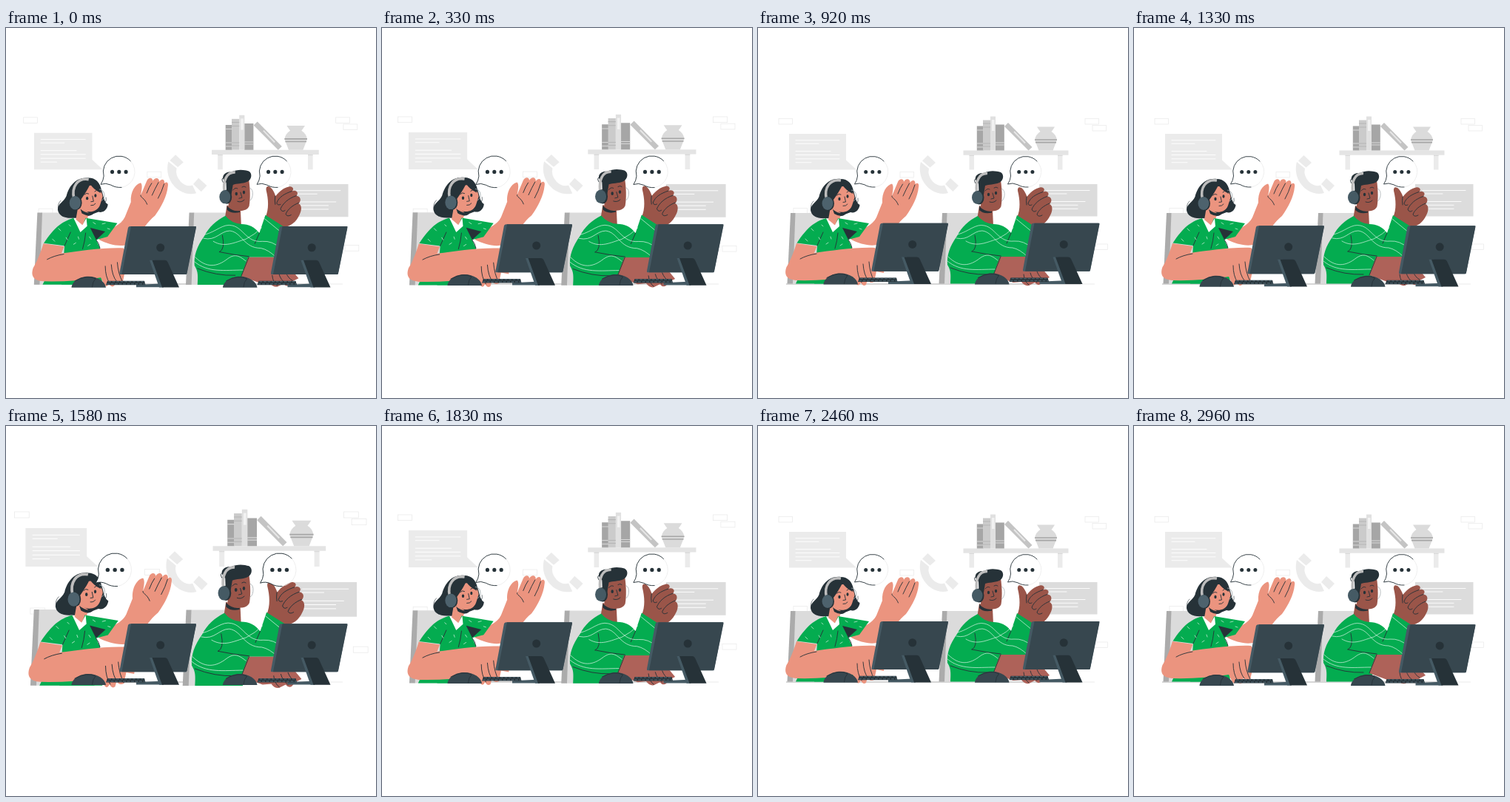
These frames come from a looping animation (500x500 px, 3000 ms). An HTML page:

```html
<!DOCTYPE html>
<html lang="en">
<head>
<meta charset="utf-8">
<title>Call centre</title>
<style>
  html, body { margin: 0; width: 100%; height: 100%; overflow: hidden; background: #fff; }
  svg { display: block; width: 100vw; height: 100vh; }
  .line { fill: none; stroke: #263238; stroke-width: .9; stroke-linecap: round; stroke-linejoin: round; }
  .white { fill: none; stroke: #fff; stroke-width: .9; stroke-linecap: round; }
  .thin { stroke-width: .6; }
  .faint { fill: none; stroke: #e9e9e9; stroke-width: .7; }
  .dark { fill: #263238; }
  .skin { fill: #eb947f; }
  .brown { fill: #9a5549; }
  .green { fill: #04ac50; }
</style>
</head>
<body>
<svg viewBox="0 0 500 500">
  <defs>
    <g id="bubble">
      <path fill="#fff" d="M134.500 200A21 21 0 1 1 144 211.800Q137 208.500 130.500 211Q134 206 134.500 200Z"/>
      <path class="faint" d="M170 180A21 21 0 0 1 158 215"/>
      <path class="line" d="M170 180A21 21 0 0 0 134.500 200Q134 206 130.500 211Q137 208.500 144 211.800Q150 215.500 158 215"/>
      <g class="dark">
        <circle cx="145.700" cy="194.400" r="2.500"/><circle cx="154.800" cy="194.400" r="2.500"/><circle cx="163.900" cy="194.400" r="2.500"/>
      </g>
    </g>
    <g id="desk-set">
      <path fill="#455a64" d="M176 347.300L209 345.800L212 350.500H176Z"/>
      <path class="dark" d="M137 342H187L188.500 347.500H135Z"/>
      <path d="M138 343H187M136 346H188" stroke="#455a64" stroke-width="1.500" stroke-dasharray="4 1.500" fill="none"/>
      <path fill="#455a64" d="M168 268.300H257L244 333.300H154.500Q153 333.300 153.500 331L165 270Q165.500 268.300 168 268.300Z"/>
      <path fill="#37474f" d="M169 268.300H255.500Q257.200 268.300 256.900 270.200L244.600 331.500Q244.200 333.300 242.500 333.300H156.500Z"/>
      <circle class="dark" cx="208.700" cy="297" r="5.500"/>
      <path fill="#455a64" d="M194 314H201L213 350.700H207Z"/>
      <path class="dark" d="M197.500 314H215Q217.500 314 218.500 316.500L234 350.700H211Z"/>
      <path fill="#37474f" d="M88.500 351C89 343 99 336 111.500 336C124 336 134 343 135 351Z"/>
      <path class="line" d="M93 342Q110 333 121 339Q117 343 116.500 350"/>
    </g>
    <rect id="tag" class="faint" width="18.500" height="7.500"/>
    <g id="chair">
      <path fill="#dbdbdb" d="M50 250H93V345.500H46Z"/>
      <path fill="#ababab" d="M44 250H50.500L47 345.500H39.500Z"/>
    </g>
  </defs>

  <g id="wall">
    <g id="tags"></g>

    <path fill="#ebebeb" d="M42 143H119V178.500L133 191.500H42Z"/>
    <path class="white" d="M51 151.700H110M51 156.300H82M51 166.500H98M51 171.500H110M51 176.800H110M51 181.700H72"/>

    <path fill="#ebebeb" d="M285.500 171H292V191.500H285.500ZM405 171H411.500V191.500H405Z"/>
    <path fill="#e4e4e4" d="M277.500 165.500H419.500V171.700H277.500Z"/>
    <path fill="#dadada" d="M285.500 171.700H292V173H285.500ZM405 171.700H411.500V173H405Z"/>
    <path fill="#a6a6a6" d="M295.800 132.500H304.500V165.500H295.800ZM320.800 130.500H332.800V165.500H320.800Z"/>
    <path fill="#cbcbcb" d="M304 124.500H314V165.500H304Z"/>
    <path fill="#e0e0e0" d="M314 119.500H321V165.500H314Z"/>
    <path fill="#f2f2f2" d="M316 124H319.500V139H316Z"/>
    <path stroke="#d8d8d8" fill="none" d="M295.800 138H304.500M295.800 156H304.500M295.800 161H304.500M320.800 155H332.800M320.800 158H332.800"/>
    <path stroke="#b5b5b5" fill="none" d="M304 129H314M304 134H314M304 156H314M304 160H314"/>
    <path fill="#c4c4c4" d="M338 128L370.500 161L365.500 165.500L333 133Z"/>
    <path stroke="#e6e6e6" stroke-width="2" fill="none" d="M346 140L361 155.500"/>
    <path fill="#dbdbdb" d="M377 133.500H401Q399 137 396.500 140Q403 144 404 151.500L398.500 165.500H379.500L374 151.500Q375 144 381.500 140Q379 137 377 133.500Z"/>
    <path stroke="#a6a6a6" stroke-width="1.600" fill="none" d="M374 151H404M375 154.600H403"/>

    <path fill="#ebebeb" d="M229.500 172L240 182L232.500 188.500L222 179.500ZM260 203L271 213L263.500 221L253 211ZM220 181C216 196 222 211 235 219.500Q246 226 257 223L252 212.500Q244 215 236.500 208Q228.500 199 231 190Z"/>

    <path fill="#dcdcdc" d="M380 211H458.500V254.500H378Z"/>
    <path class="white" d="M390 219.500H448M390 224H417M390 234.500H442M390 239.300H432M390 244.300H432"/>
  </g>

  <path stroke="#777" stroke-width=".6" fill="none" d="M38 346H436"/>
  <path stroke="#ddd" stroke-width=".6" fill="none" d="M436 346H455"/>

  <g id="woman">
    <use href="#chair"/>
    <path class="skin" d="M126 282C142 270 155 267 160 256L168 236C167 222 174 212 181 210.500C184 213 182 222 181 227L189 208C191 203 197 203 197 208C200 202 206 204 205.500 209C209 204 213 206 212.500 211C216 208 218 211 217 215C216 228 208 243 200 254C190 262 182 275 172 288C160 298 140 293 126 286Z"/>
    <path class="line" d="M195.500 211Q192 216 189 224M204.500 210Q200 218 196 227M212 212Q209 222 204 231M181 227C180 230 186 230 189.500 239"/>
    <path class="dark" d="M112 204C96 202 86 214 82.500 228C79 236 71 238 71 246C72 254 80 258 92 257Q103 258 112 254L125 249C132 251 137 245 137.500 239C132 236 132 228 129 220C127 210 121 204 112 204Z"/>
    <path class="line thin" d="M75 234C69 240 71 248 78 255M131 233Q136 240 135 230"/>
    <path class="skin" d="M98 242L112 250L108 270L95 259Z"/>
    <path class="dark" d="M101 245Q110 253 120 249Q115 258 103 251Z"/>
    <path class="skin" d="M100 226C104 213 119 210 125 220Q130 222 130.500 229Q129 234 127 240C123 251 108 251 101 244Z"/>
    <path class="dark" d="M96 242C102 231 110 222 114 212C117 217 122 221 128 224C128 213 121 205 112 205C99 206 92 220 96 242Z"/>
    <path class="line" d="M106.500 226Q109 223 112 225M120 222Q123 219 125 221M117 228L118.500 235L115 235.500M115 240.500Q119 241 121 238"/>
    <ellipse class="dark" cx="110" cy="231" rx="1.600" ry="2.200"/><ellipse class="dark" cx="121" cy="227.500" rx="1.500" ry="2.200"/>
    <path fill="none" stroke="#9aa5aa" stroke-width=".8" d="M126 219Q133 220 133 228Q132 233 129 234"/>
    <path fill="none" stroke="#bdbdbd" stroke-width="3.500" d="M92.500 231C89 216 97 203.500 112 206"/>
    <ellipse class="dark" cx="96" cy="237" rx="7" ry="9.500"/>
    <ellipse fill="#4d626d" cx="94" cy="237" rx="7.500" ry="9"/>

    <path class="green" d="M92 257C76 262 67 269 52.500 290.500L80 294L76 345.500H130L127 297L122 286L137 282L150 264L108 257L102 273Z"/>
    <path class="green" d="M55 337H120V345.500H51Z"/>
    <path fill="#fff" d="M92 257L101 276L110 268L109 257L103 268Z"/>
    <path class="dark" d="M114 270L134 275L122 286Z"/>
    <path class="line" d="M80 294L88 276M108 277Q107 288 104 298M122 286Q126 291 127 297"/>
    <path class="white thin" d="M64 285L67 288M72 271L75 274M82 283L84 286M92 292L95 290M98 282L99 285M113 282L115 285M118 263L121 265M130 265L134 264M137 271L140 272M111 294L114 292M86 266L88 268"/>
    <path class="skin" d="M52 291L79.500 295L76 304C100 301 130 296 158 297L172 315L170 331L160 329L157 343Q151 346 148 340L146 347Q142 350 139 344Q136 350 133 346L128 336Q90 342 52 341C38 340 35 333 38.500 323C43 316 48 304 52 291Z"/>
    <path class="line" d="M57 312Q66 307 79 305M134 321Q134 335 140 344M142 319Q143 334 149 341M150 316Q151 331 157 342"/>
  </g>

  <g id="man">
    <use href="#chair" x="205"/>
    <path class="brown" d="M299 240L317 246L318 268L296 259Z"/>
    <path class="dark" d="M299 241Q307 249 316 247.500V249.500Q305 252 299 246Z"/>
    <path class="brown" d="M302 211L328 206C330 219 330 232 328.500 241C325 250 309 249 301 241Z"/>
    <path class="dark" d="M298 210C289 203 296 195 305 196C313 192 322 193 328 195C333 198 332 206 326 209C319 212 312 211 307 213L305 225L299 238Z"/>
    <path class="line" d="M294 210Q290 204 296 203M307 220Q310 216 313 218M319 216Q322 214 324 216M317 223L319 230L315 231M313 235Q318 237 322 233"/>
    <ellipse class="dark" cx="311.500" cy="225" rx="1.700" ry="2.300"/><ellipse class="dark" cx="321.500" cy="223" rx="1.600" ry="2.300"/>
    <path fill="none" stroke="#aab1b5" stroke-width=".8" d="M329 217Q334 219 333 227Q332 233 329 234"/>
    <path fill="none" stroke="#bdbdbd" stroke-width="3.500" d="M295.500 221C294 208 298 196 310 196.500"/>
    <ellipse class="dark" cx="299" cy="229" rx="6.500" ry="9.500"/>
    <ellipse fill="#455a64" cx="296.300" cy="229" rx="7.300" ry="9"/>

    <path class="brown" d="M350 256C355 245 354 232 351 220C350 213 358 212 363.500 228C368 222 374 217 381 215.500C386 214 389 219 385 221.500C391 219 395 224 391 227.500C397 228 398 234 394 238C399 240 398 248 395 253C391 262 383 269 373 269Z"/>
    <path class="line" d="M363 228Q362 234 363 239M385 221.500C375 225 368 229 365 237Q366 241 370 239M391 227.500C380 231 373 238 370 245Q372 250 376 247M394 237C386 240 379 246 377 252Q379 256 384 253"/>
    <path class="green" d="M297 254C285 260 275 269 269 281C259 295 255 307 256 320C260 327 261 330 260 345.500H320L328 309L363 309C370 300 372 285 373.500 268L350 253L342 277C336 269 328 265 318 265Q305 264 297 254Z"/>
    <path fill="#ae6259" d="M327 309H362L384 325L394 337L386 341L382 346Q378 349 374 344L366 348Q360 349 356 343L345 344L318 334Z"/>
    <path class="line" d="M359 333Q360 343 366 347M368 331Q370 339 377 344M377 329Q380 337 386 340M289 302Q297 299 293 280M289 302Q308 306 328 308M342 277L336 291M328 309L318 334M260 324Q285 334 310 333"/>
    <path class="white thin" d="M268 284C285 288 290 274 303 274C319 276 321 297 344 297Q354 299 364 309M257 309C272 324 286 322 300 311C310 304 315 307 324 314M270 279C285 275 294 264 306 267C321 270 325 290 346 288Q359 287 370 297M256 315C274 330 296 326 320 326M349 258L371 276M281 288C296 297 310 289 324 285Q336 279 345 270"/>
  </g>

  <g id="bubbles">
    <use href="#bubble"/>
    <use href="#bubble" x="207"/>
  </g>

  <g id="desk">
    <use href="#desk-set"/>
    <use href="#desk-set" x="204.500"/>
  </g>
</svg>
<script>
  const LOOP = 3000, BEAT = 1500, STEP = 1000 / 24, LEAD = 29;

  // Each group beats about its own centre.
  const centers = { wall: [250, 210], woman: [127, 276], man: [322, 271], bubbles: [257, 194] };
  const byId = id => document.getElementById(id);

  byId('tags').innerHTML =
    [[28, 122.5], [442, 122.5], [452, 131.5], [454, 292], [48, 243.5], [192, 194.5]]
      .map(([x, y]) => `<use href="#tag" x="${x}" y="${y}"/>`).join('');

  // Linear interpolation through [position, value] stops.
  function along(stops, p) {
    const i = stops.findIndex(([pos]) => pos >= p);
    if (i < 1) return stops[0][1];
    const [p0, v0] = stops[i - 1], [p1, v1] = stops[i];
    return v0 + (v1 - v0) * (p - p0) / (p1 - p0);
  }

  const heartbeat = [[0, 1], [.1, 1.1], [.3, 1], [.4, 1], [.5, 1.1], [.6, 1], [1, 1]];
  const floating = [[0, 0], [.5, -6.2], [1, 0]];

  function render(ms) {
    const stepped = Math.floor((ms % LOOP + 5) / STEP) * STEP;
    const phase = (stepped + LEAD) % BEAT / BEAT;
    const scale = along(heartbeat, phase);
    for (const [id, [x, y]] of Object.entries(centers)) {
      byId(id).setAttribute('transform', `translate(${x} ${y}) scale(${scale}) translate(${-x} ${-y})`);
    }
    byId('desk').setAttribute('transform', `translate(0 ${along(floating, phase)})`);
  }

  const start = performance.now();
  function tick() {
    render(performance.now() - start);
    requestAnimationFrame(tick);
  }
  render(0);
  requestAnimationFrame(tick);
</script>
</body>
</html>
```
